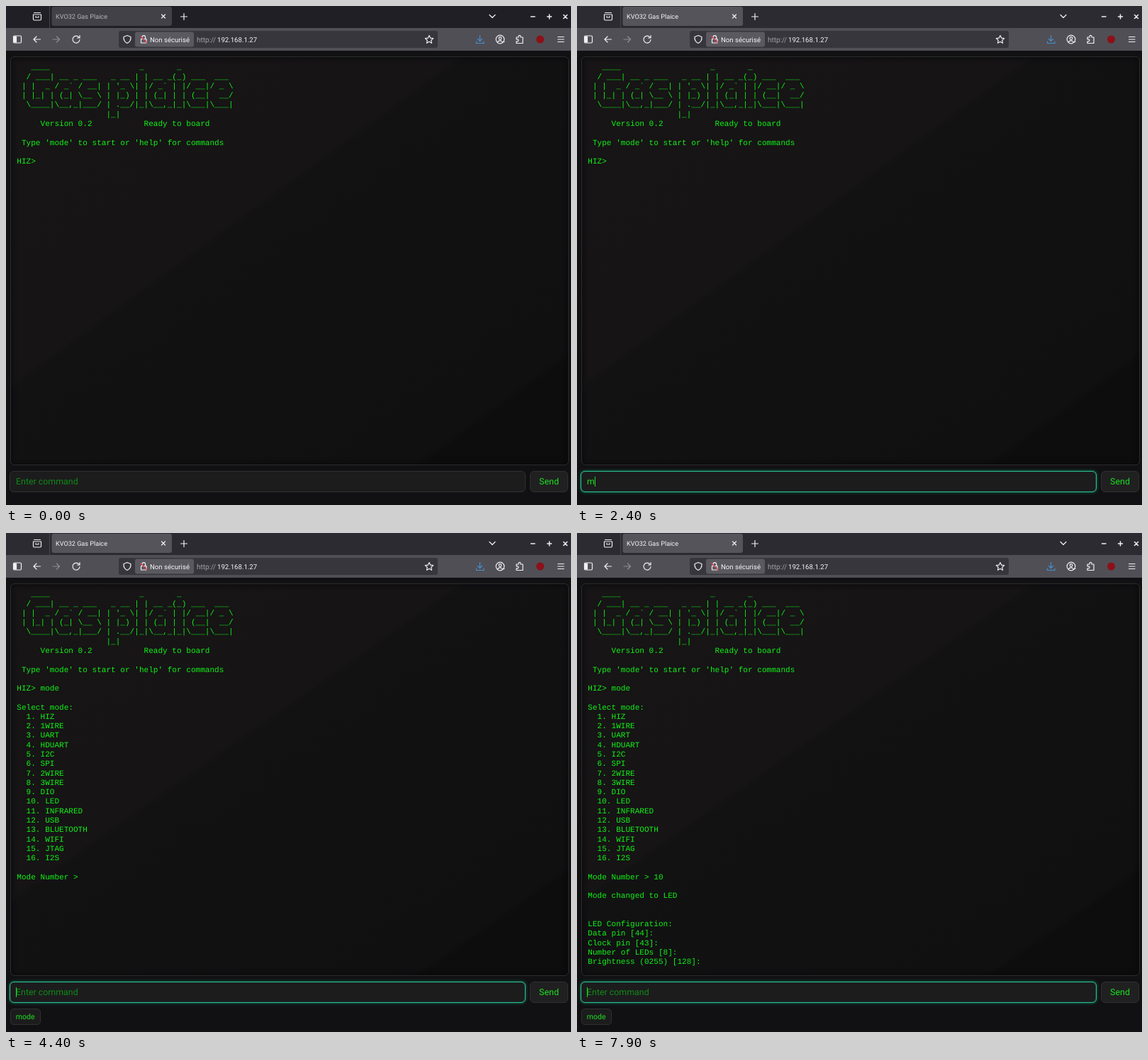
An HTML page that plays this animation: 797 px wide and 703 px high, repeating every 8 s.

```html
<!DOCTYPE html>
<html lang="fr">
<head>
<meta charset="utf-8">
<title>Terminal</title>
<style>
  html, body { margin: 0; width: 100%; height: 100%; overflow: hidden; background: #111113; }
  body { position: relative; font: 12.4px Roboto, sans-serif; color: #1be01f; text-rendering: geometricPrecision; }
  body > * { position: absolute; box-sizing: border-box; }
  #chrome { left: 0; top: 0; }
  #chrome text { font: 9.6px Roboto, sans-serif; fill: #f4f4f6; }
  #strip { fill: #201f25; }
  #tab { fill: #424147; }
  #chrome #title { font-size: 9.1px; fill: #b4b3b8; }
  #chrome #scheme { font-size: 10px; fill: #a3a2a8; }
  .active #strip { fill: #2c2b31; }
  .active #tab { fill: #55545b; }
  .active #chrome #title { fill: #f4f4f6; }
  #panel {
    left: 5.5px; top: 70.5px; width: 788px; height: 576px;
    border: 1px solid #2b2b2d; border-radius: 6px;
    background: linear-gradient(to bottom right, #171516, #161415 40%, #121213 41%, #101011 86%, #0d0d0d 87%);
    box-shadow: inset 0 0 8px #08080a;
  }
  #screen {
    left: 15.3px; top: 81.25px; margin: 0; color: #10f216;
    font: 11.075px/13.275px "Liberation Mono", monospace;
  }
  #input, #send, #chip { border: 1px solid #303032; border-radius: 6px; background: #1c1c1d; white-space: pre; }
  #input { left: 5px; top: 655px; width: 728px; height: 30px; padding-left: 8px; line-height: 29px; }
  #send { left: 739px; top: 655px; width: 54px; height: 30px; line-height: 29px; text-align: center; background: #202021; }
  #chip { left: 5.5px; top: 670px; width: 43.5px; height: 23px; line-height: 22px; text-align: center; font-size: 10.6px; border-radius: 5px; visibility: hidden; }
  #hint { color: #118a17; }
  #caret { display: inline-block; width: 1px; height: 14px; margin-right: -1px; vertical-align: -3px; background: #1be01f; }
  .active #input { border-color: #2bbd90; box-shadow: inset 0 0 1px #2bbd90, 0 0 4px #137553; }
  .used #panel { height: 553px; }
  .used #input, .used #send { top: 632px; }
  .used #chip { visibility: visible; }
</style>
</head>
<body>
<svg id="chrome" width="797" height="63" fill="none" stroke-width="1.2" stroke-linecap="round" stroke-linejoin="round">
  <rect id="strip" width="797" height="31"/>
  <rect y="31" width="797" height="32" fill="#514f56"/>
  <path d="M61.5 0V31" stroke="#45444a" stroke-width="1"/>
  <rect id="tab" x="64.5" y="1" width="169.5" height="27" rx="3"/>
  <rect x="159" y="35" width="450" height="24" rx="3" fill="#37363c"/>
  <rect x="182" y="36.5" width="83" height="21" rx="3" fill="#5a5960"/>
  <text id="title" x="70" y="18">KVO32 Gas Plaice</text>
  <text x="203" y="50.5">Non sécurisé</text>
  <text id="scheme" x="269" y="50.5">http://</text>
  <text x="298" y="50.5">192.168.1.27</text>
  <g stroke="#f0f0f2">
    <path d="M39.5 9.5H48.5M38.5 12H49.5V18.5Q49.5 20 48 20H40Q38.5 20 38.5 18.5ZM42 14.5V16H46V14.5"/>
    <path d="M219.5 12L224.5 17M224.5 12L219.5 17M246.5 15H255.5M251 10.5V19.5M682 12.5L686 16.5L690 12.5"/>
    <path d="M740.5 15H746M763.5 15H769.5M766.5 12V18M786.5 12.5L791.5 17.5M791.5 12.5L786.5 17.5" stroke-width="1.5"/>
    <rect x="10.5" y="42" width="11" height="10" rx="1.5"/>
    <path d="M11 43H14.5V51H11Z" fill="#f0f0f2"/>
    <path d="M48.5 47H39M43 43L39 47L43 51"/>
    <path d="M66 47H75.5M71.5 43L75.5 47L71.5 51" stroke="#8d8c92"/>
    <path d="M103 44A5 5 0 1 0 104 47.5M104 41.5V45H100.5"/>
    <path d="M171 41.5L176 43.5Q176.5 50 171 52.5Q165.5 50 166 43.5Z"/>
    <path d="M190.5 46.5H198V52H190.5ZM192 46.5V44A2.3 2.3 0 0 1 196.6 44V46.5"/>
    <path d="M189.5 42.5L199 52" stroke="#e2384d"/>
    <path d="M597 41.5L598.7 45.1L602.7 45.6L599.8 48.3L600.5 52.3L597 50.3L593.5 52.3L594.2 48.3L591.3 45.6L595.3 45.1Z"/>
    <path d="M668.5 41.5V49M665.5 46.5L668.5 49.5L671.5 46.5M663.5 50V52.5H674V50" stroke="#438fce"/>
    <circle cx="697" cy="47" r="5.8"/>
    <circle cx="697" cy="45.5" r="1.8"/>
    <path d="M693.5 51Q694 48.8 697 48.8H699M699 50.5H703"/>
    <path d="M720 44H723V42.8A1.5 1.5 0 0 1 726 42.8V44H729V52.5H720V49.8H721.5A1.5 1.5 0 0 0 721.5 46.8H720Z"/>
    <path d="M778.5 43.5H787M778.5 47H787M778.5 50.5H787"/>
  </g>
  <circle cx="753.5" cy="47" r="5.5" fill="#8c1018"/>
</svg>
<div id="panel"></div>
<pre id="screen">
   ____                   _       _
  / ___| __ _ ___   _ __ | | __ _(_) ___  ___
 | |  _ / _` / __| | '_ \| |/ _` | |/ __|/ _ \
 | |_| | (_| \__ \ | |_) | | (_| | | (__|  __/
  \____|\__,_|___/ | .__/|_|\__,_|_|\___|\___|
                   |_|
     Version 0.2           Ready to board

 Type 'mode' to start or 'help' for commands

HIZ&gt;</pre>
<div id="input"><span id="typed"></span><i id="caret"></i><span id="hint">Enter command</span></div>
<div id="send">Send</div>
<div id="chip">mode</div>
<script>
  const LOOP = 8000, FOCUS = 1400, SUBMIT = 3200, BLINK = 500;
  const [screenEl, typedEl, caretEl, hintEl] =
    ['screen', 'typed', 'caret', 'hint'].map(id => document.getElementById(id));
  const banner = screenEl.textContent;
  const modes = 'HIZ 1WIRE UART HDUART I2C SPI 2WIRE 3WIRE DIO LED INFRARED USB BLUETOOTH WIFI JTAG I2S'
    .split(' ').map((name, i) => `  ${i + 1}. ${name}`).join('\n');

  // [time, input value, text added to the terminal]
  const keys = [
    [FOCUS, '', ''],
    [2400, 'm', ''], [2500, 'mo', ''], [2700, 'mod', ''], [2800, 'mode', ''],
    [SUBMIT, '', ` mode\n\nSelect mode:\n${modes}\n\nMode Number >`],
    [5700, '1', ''], [5900, '10', ''],
    [6100, '', ' 10\n\nMode changed to LED\n\n\nLED Configuration:\nData pin [44]:'],
    [6600, '', '\nClock pin [43]:'],
    [7000, '', '\nNumber of LEDs [8]:'],
    [7700, '', '\nBrightness (0255) [128]:']
  ];

  function setText(el, text) {
    if (el.textContent !== text) el.textContent = text;
  }

  function render(t) {
    const past = keys.filter(([time]) => time <= t);
    const [lastKey, value] = past.at(-1) || [0, ''];
    setText(screenEl, banner + past.map(key => key[2]).join(''));
    setText(typedEl, value);
    hintEl.hidden = value !== '';
    const caretOn = t >= FOCUS && (t - lastKey) % (2 * BLINK) < BLINK;
    caretEl.style.visibility = caretOn ? 'visible' : 'hidden';
    document.body.classList.toggle('active', t >= FOCUS);
    document.body.classList.toggle('used', t >= SUBMIT);
  }

  const start = performance.now();
  function tick() {
    render((performance.now() - start) % LOOP);
    requestAnimationFrame(tick);
  }
  tick();
</script>
</body>
</html>
```
